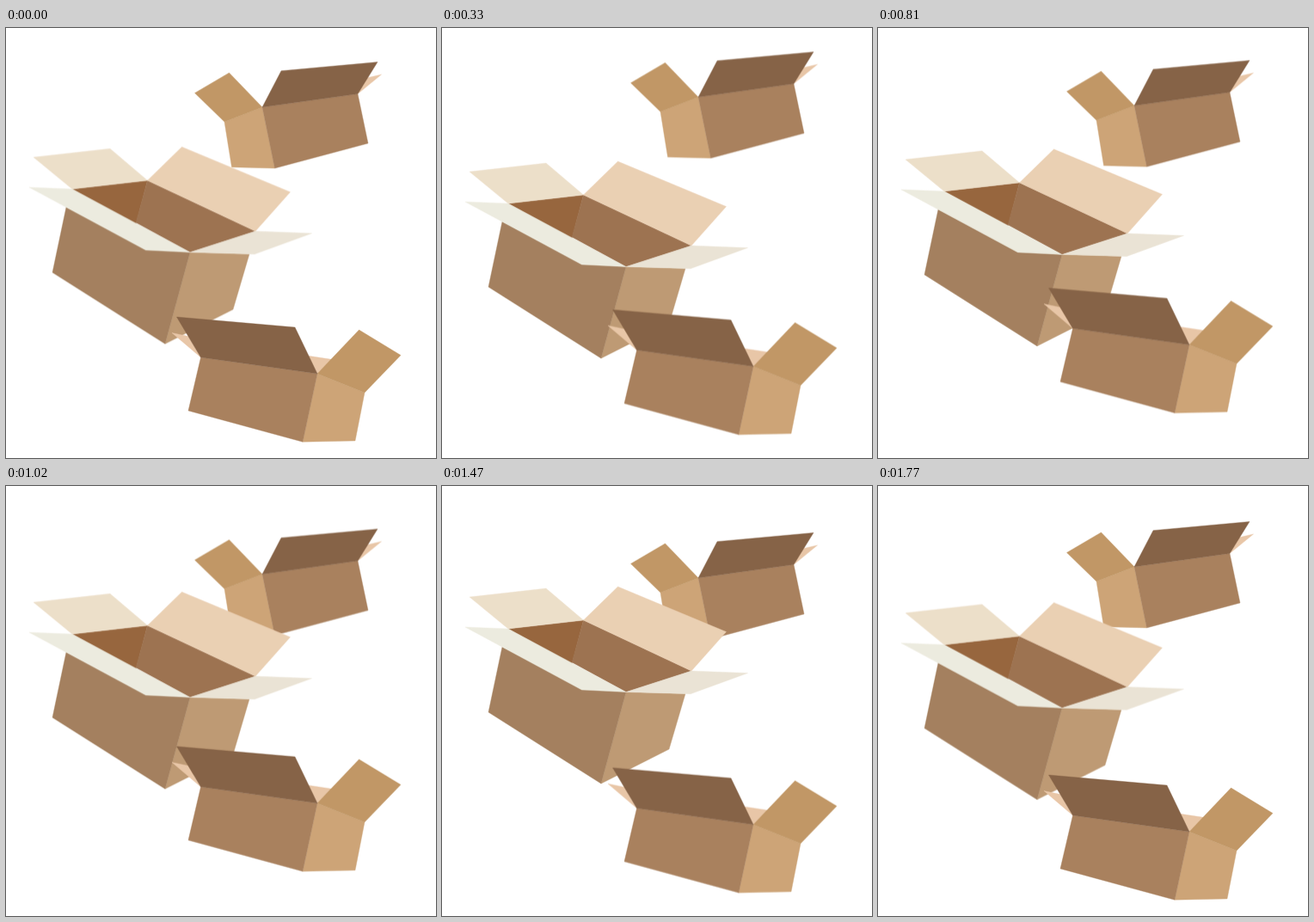
An HTML page without scripts for the animation above (1.8 s loop, 500 by 500 pixels).

```html
<!DOCTYPE html>
<html lang="en">
<head>
<meta charset="utf-8">
<title>Floating boxes</title>
<style>
  html, body { margin: 0; width: 100%; height: 100%; overflow: hidden; background: #fff; }
  svg { display: block; width: 100%; height: 100%; }

  polygon { fill: currentColor; stroke: currentColor; stroke-width: .4; stroke-linejoin: round; }

  .box { animation: bob 900ms cubic-bezier(.52, 0, .48, 1) infinite alternate; }
  .top { --from: 16px; --to: -12px; animation-delay: -480ms; }
  .open { --from: -22.6px; --to: 17.6px; animation-delay: -480ms; }
  .low { --from: 0px; --to: -34.1px; }

  @keyframes bob {
    from { transform: translateY(var(--from)); }
    to { transform: translateY(var(--to)); }
  }

  .front { color: #a9815e; }
  .side { color: #cda477; }
  .lid { color: #866347; }
  .flap { color: #c19766; }
  .peach { color: #e8c6a7; }
</style>
</head>
<body>
<svg viewBox="0 0 500 500">
  <g class="box top">
    <polygon class="peach" points="409,76.5 417,58.5 436.5,54"/>
    <polygon class="side" points="254,109 298,92 312.5,163 262.5,161.7"/>
    <polygon class="flap" points="219.5,75.5 259.5,52 298,92 254,109"/>
    <polygon class="front" points="298,92 409,76.5 421,134 312.5,163"/>
    <polygon class="lid" points="320,49.7 432,39.5 409,76.5 298,92"/>
  </g>

  <g class="box open">
    <polygon color="#97663e" points="77,187 164.5,177 151,228"/>
    <polygon color="#9d7351" points="164.5,177 290,236 214,260.5 151,226"/>
    <polygon color="#ecdfc9" points="32,150 121,140 164.5,177 77,187"/>
    <polygon color="#ead0b3" points="164.5,177 204.5,138 330.5,190.5 290,236"/>
    <polygon color="#be9a74" points="214,260.5 283,262.5 264,327 185,367"/>
    <polygon color="#a4805f" points="70,208 162,256 214,260.5 185,367 54,284"/>
    <polygon color="#eae3d5" points="214,260.5 290,236 355.5,238.5 289,262.7"/>
    <polygon color="#ecebdf" points="27,185 77,187 214,260.5 162.5,258"/>
  </g>

  <g class="box low">
    <polygon class="peach" points="193,354.5 212,358.5 226.5,383"/>
    <polygon class="peach" points="350,381 380,385.5 362,402"/>
    <polygon class="side" points="362,402 417,424 406,480 345,481.3"/>
    <polygon class="flap" points="362,402 410.5,351 459,380.5 417,424"/>
    <polygon class="front" points="226.5,383 362,402 345,481.3 212,445"/>
    <polygon class="lid" points="198.5,336 336,348 362,402 226.5,383"/>
  </g>
</svg>
</body>
</html>
```
